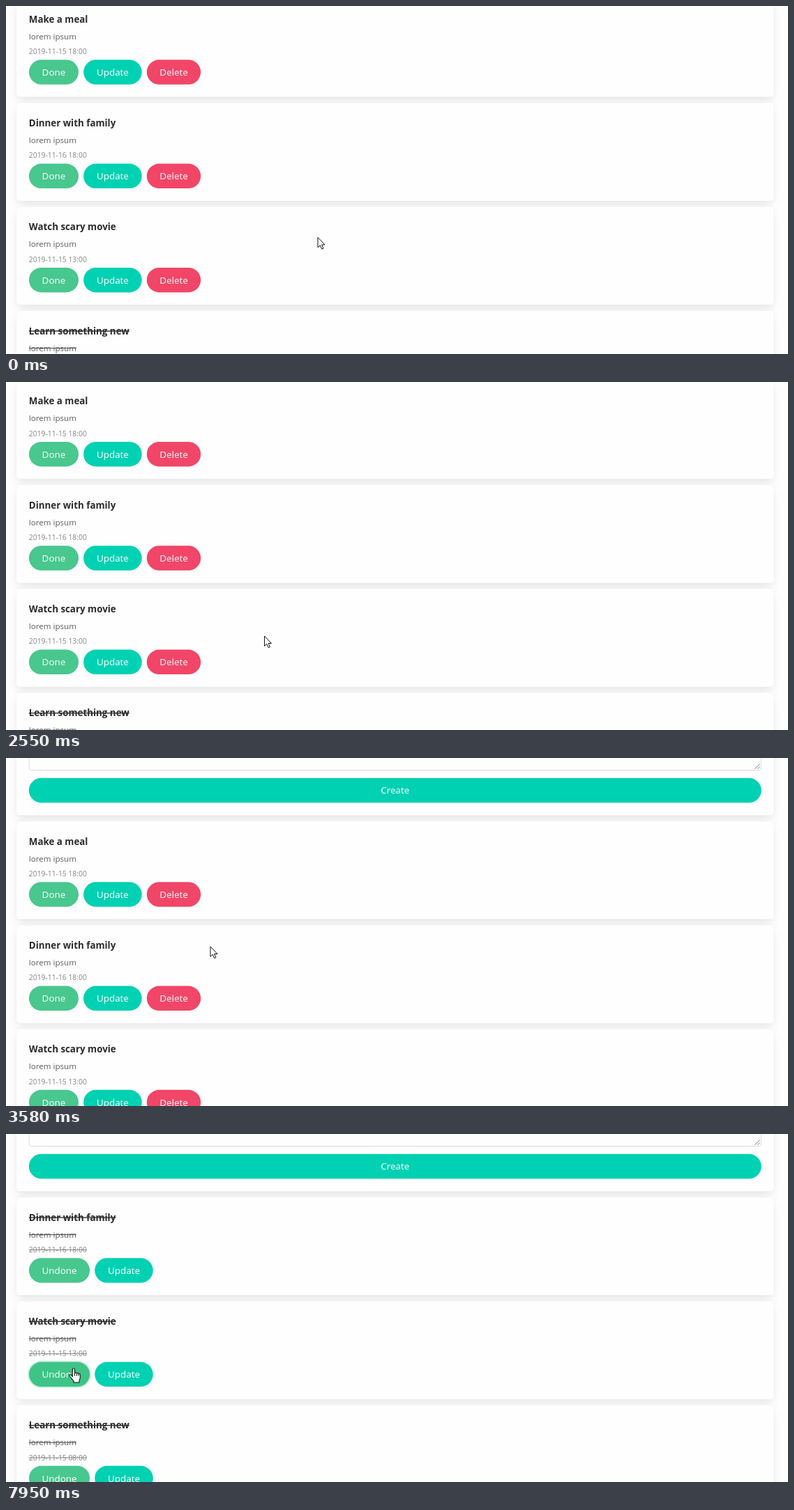
Animation, 1121 px wide and 500 px high, one loop 8 s. Source, as an HTML page:

```html
<!DOCTYPE html>
<html lang="en">
<head>
<meta charset="utf-8">
<title>Task list</title>
<style>
html, body { margin: 0; width: 100%; height: 100%; overflow: hidden; background: #fefefe; }
svg { display: block; width: 1121px; height: 500px; }
text { font-family: "Open Sans", "Noto Sans", sans-serif; white-space: pre; }
.title { font-size: 13.35px; font-weight: 700; fill: #2b2b2b; }
.note { font-size: 11.6px; fill: #5c5c5c; }
.date { font-size: 10.35px; fill: #858585; }
.label { font-size: 13.45px; fill: #fff; text-anchor: middle; }
.hint { font-size: 13.3px; fill: #c4c4c4; }
.struck text:not(.label) { text-decoration: line-through 1px; }
</style>
</head>
<body>
<svg viewBox="0 0 1121 500">
  <defs>
    <filter id="blur" x="-5%" y="-30%" width="110%" height="160%">
      <feGaussianBlur stdDeviation="7.1"/>
    </filter>
  </defs>
  <g id="page"></g>
  <g id="arrow" fill="#fff" stroke="#111" stroke-width="1">
    <path d="M.5 .5V14.9L3.8 11.8L6.2 17.2L8.5 16.2L6.1 11H10.5Z"/>
  </g>
  <g id="hand" fill="#fff" stroke="#111" stroke-width="1.1" stroke-linejoin="round">
    <g transform="translate(-7 -1)">
      <path d="M5.3 12.8V2.4c0-2.3 3.2-2.3 3.2 0V8c.4-1.6 2.9-1.5 3 .3.5-1.3 2.5-1.1 2.6.5.7-1 2.2-.6 2.2 1v4.4c0 1.6-1.3 3.1-1.3 4.7V21H7v-1.9c-1-1.7-4.2-4.8-5.7-7.3-1-1.9 1.2-2.7 2.5-1.2z"/>
      <path fill="none" d="M8.5 8v3.6M11.5 8.4v3.2M14.1 9v2.6"/>
    </g>
  </g>
</svg>
<script>
const LOOP = 8000, SCALE = 8 / 9;             // page zoom
const PITCH = 168 * SCALE, NOTCH = 100 * SCALE;
const BTN_H = 40 * SCALE, BTN_TOP = 178.1;
const GREEN = ["#48c78e", "#3ec487"], TEAL = ["#00d1b2", "#00c4a7"], RED = ["#f14668", "#f03a5f"];
const $ = id => document.getElementById(id);

// Wheel turns: start, length, notches above the resting place
const scroll = { from: [-1.136], moves: [
  [0, 120, -1], [480, 160, -2], [750, 280, -3],
  [2250, 328, -1], [2640, 200, 0], [2930, 280, 1], [3400, 180, 0]
] };
// Pointer moves: start, length, tip
const pointer = { from: [446.5, 332], moves: [
  [760, 660, 436.5, 334], [1880, 450, 370, 364.5], [2900, 300, 352, 357],
  [3340, 240, 292.5, 270.5], [3580, 390, 261, 201], [5040, 240, 278, 203],
  [5300, 370, 64, 196], [6500, 370, 138, 338], [6900, 240, 87, 345], [7710, 240, 97, 337]
] };
const tasks = [
  { name: "Make a meal", date: "2019-11-15 18:00", gone: 4730 },
  { name: "Dinner with family", date: "2019-11-16 18:00", done: 6100 },
  { name: "Watch scary movie", date: "2019-11-15 13:00", done: 7530 },
  { name: "Learn something new", date: "2019-11-15 08:00", done: 0 },
  { name: "Make a phone call to mom", date: "2019-11-15 04:00", done: 0 }
];

const ease = p => p * p * (3 - 2 * p);

function follow({ from, moves }, t) {
  let pos = from;
  for (const [start, length, ...to] of moves) {
    const p = ease(Math.min(1, Math.max(0, (t - start) / length)));
    pos = pos.map((v, i) => v + (to[i] - v) * p);
  }
  return pos;
}

// The last pressed button keeps a ring; "Delete" passes it to the next task.
function ringAt(t) {
  const pressed = tasks.findLast(task => task.done && t >= task.done - 120);
  if (pressed) return [pressed, 0];
  return t >= tasks[0].gone ? [tasks[1], 2] : [];
}

function box(top, height) {
  return `<rect x="16.8" y="${top + 8.9}" width="1082" height="${height - 3.6}" rx="5" fill="#0a0a0a" fill-opacity=".1" filter="url(#blur)"/>
    <rect x="14.6" y="${top - .45}" width="1086.4" height="${height + .9}" rx="5.5" fill="#fefefe" stroke="#0a0a0a" stroke-opacity=".03" stroke-width=".9"/>`;
}

function button(x, y, w, label, color, hot, ring) {
  const halo = ring
    ? `<rect x="${x - 1.8}" y="${y - 1.8}" width="${w + 3.6}" height="${BTN_H + 3.6}" rx="19.6" fill="${color[0]}" fill-opacity=".27"/>` : "";
  return `${halo}<rect x="${x}" y="${y}" width="${w}" height="${BTN_H}" rx="${BTN_H / 2}" fill="${color[+hot]}"/>
    <text class="label" x="${x + w / 2}" y="${y + 22.8}">${label}</text>`;
}

function form() {
  return box(-260, 342) +
    `<rect x="33.2" y="-96" width="1049.2" height="113.5" rx="3.5" fill="#fefefe" stroke="#d8d8d8" stroke-width=".9"/>
    <path d="M1073.5 15.5l7-7M1077.5 15.5l3-3" stroke="#777" fill="none"/>
    <text class="hint" x="43.6" y="-69.3">Description</text>` +
    button(32.8, 28.6, 1050, "Create", TEAL, false, false);
}

function buttonsOf(done) {
  return done
    ? [[32.9, 87.2, "Undone", GREEN], [127.2, 83.6, "Update", TEAL]]
    : [[32.9, 71.1, "Done", GREEN], [111.1, 83.6, "Update", TEAL], [201.8, 77.4, "Delete", RED]];
}

let shown = "";

function draw(t) {
  const dy = follow(scroll, t)[0] * NOTCH + .1;
  const [px, py] = follow(pointer, t);
  const [ringTask, ringButton] = ringAt(t);
  let over = false, html = form();

  tasks.filter(task => !(t >= task.gone)).forEach((task, row) => {
    const y = row * PITCH, top = y + BTN_TOP;
    const done = t >= task.done;
    html += `<g class="${done ? "struck" : ""}">` + box(y + 90.9, 140.4) +
      `<text class="title" x="32.8" y="${y + 124.6}">${task.name}</text>
      <text class="note" x="32.8" y="${y + 148.5}">lorem ipsum</text>
      <text class="date" x="32.8" y="${y + 170}">${task.date}</text>`;
    buttonsOf(done).forEach(([x, w, label, color], i) => {
      const hot = px >= x && px <= x + w && py - dy >= top && py - dy <= top + BTN_H;
      over = over || hot;
      html += button(x, top, w, label, color, hot, task === ringTask && i === ringButton);
    });
    html += "</g>";
  });

  if (html !== shown) $("page").innerHTML = shown = html;
  $("page").setAttribute("transform", `translate(0 ${dy})`);
  for (const id of ["arrow", "hand"]) {
    $(id).setAttribute("transform", `translate(${px} ${py})`);
    $(id).setAttribute("display", (id === "hand") === over ? "inline" : "none");
  }
}

function tick(now) {
  draw(now % LOOP);
  requestAnimationFrame(tick);
}
draw(0);
requestAnimationFrame(tick);
</script>
</body>
</html>
```
